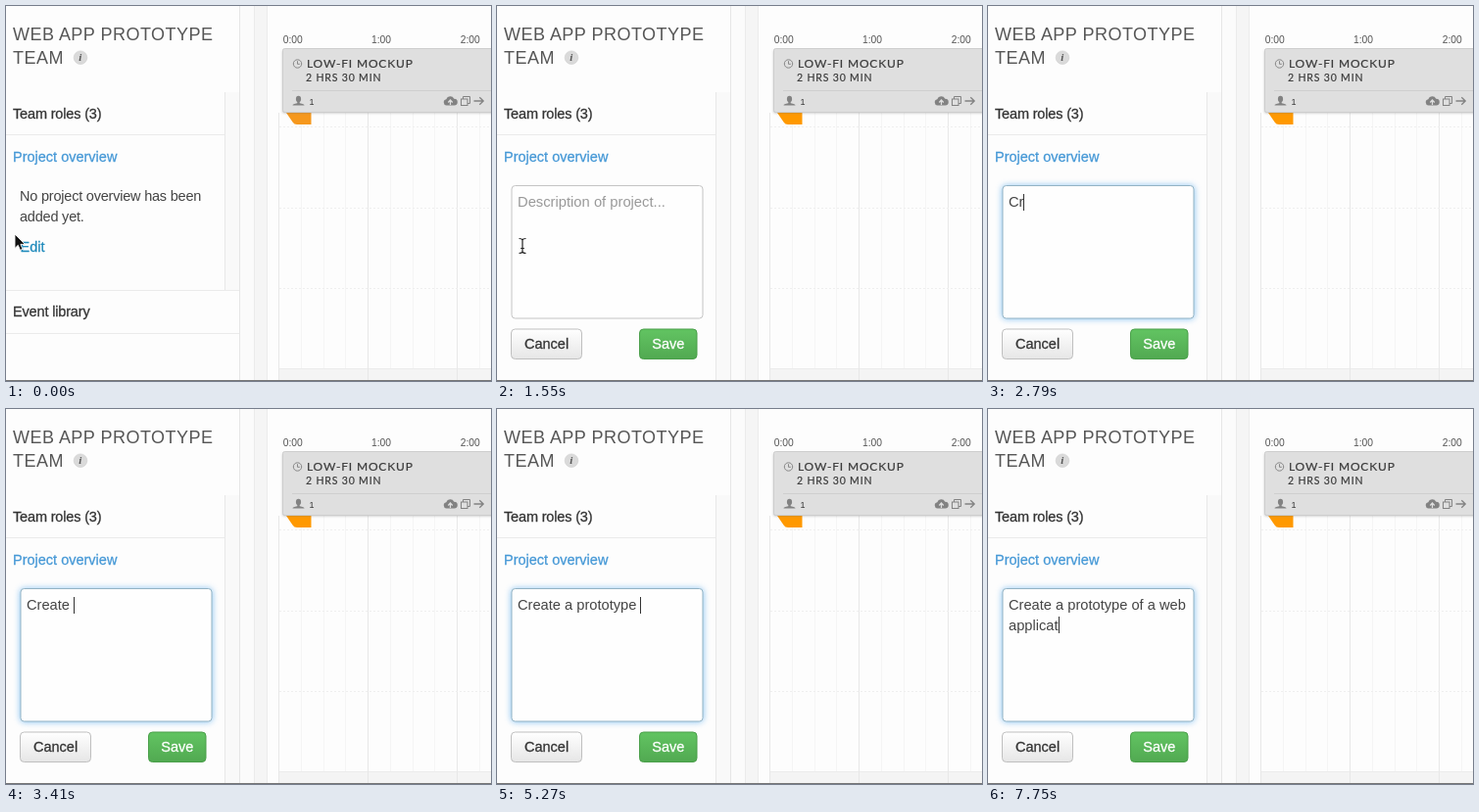
Write an HTML page that moves like this. It is 495 px wide and 383 px high and loops after 8000 ms.

```html
<!DOCTYPE html>
<html lang="en">
<head>
<meta charset="utf-8">
<title>Project overview editor</title>
<style>
html, body { margin: 0; width: 100%; height: 100%; overflow: hidden; background: #fdfdfd; }
svg { display: block; width: 495px; height: 383px; }
text { font-family: "Liberation Sans", Arial, sans-serif; font-size: 14.5px; fill: #333; white-space: pre; }
.title { font-size: 18px; letter-spacing: .47px; fill: #565656; }
.light { letter-spacing: -.21px; fill: #444; }
.head { letter-spacing: -.16px; }
.head, .link, .bold { stroke-width: .28px; }
.head { stroke: #333; }
.link { fill: #4598d6; stroke: #4598d6; }
.typed { font-size: 14.67px; fill: #444; }
.hint { font-size: 14.75px; fill: #999; }
.hour { font-size: 10.3px; fill: #555; }
.card { font-family: Lato, sans-serif; letter-spacing: .83px; fill: #3c3c3c; stroke: #3c3c3c; stroke-width: .2px; }
.crisp { shape-rendering: crispEdges; }
</style>
</head>
<body>
<svg viewBox="0 0 495 383" xmlns="http://www.w3.org/2000/svg">
  <defs>
    <linearGradient id="pale" x2="0" y2="1"><stop stop-color="#fff"/><stop offset="1" stop-color="#e6e6e6"/></linearGradient>
    <linearGradient id="green" x2="0" y2="1"><stop stop-color="#62c462"/><stop offset="1" stop-color="#51a951"/></linearGradient>
    <filter id="blur" x="-10%" y="-10%" width="120%" height="120%"><feGaussianBlur stdDeviation="3"/></filter>
    <filter id="soft" x="-10%" y="-10%" width="120%" height="130%"><feGaussianBlur stdDeviation="1"/></filter>
  </defs>

  <rect width="495" height="383" fill="#fdfdfd"/>
  <g id="frame" class="crisp"></g>

  <!-- timeline -->
  <text class="hour" x="282.700" y="38">0:00</text>
  <text class="hour" x="373" y="38">1:00</text>
  <text class="hour" x="463.700" y="38">2:00</text>
  <path id="flag" d="M286 109H311.500V121H297Q294 121 292.500 118.500Z"/>
  <rect x="282" y="45" width="220" height="64.500" rx="2" fill="#777" opacity=".4" filter="url(#soft)"/>
  <rect x="282.500" y="43.500" width="220" height="65" rx="2" fill="#dfdfdf" stroke="#cdcdcd"/>
  <path class="crisp" d="M292 86.500H495" stroke="#cfcfcf"/>
  <g fill="none" stroke="#888">
    <circle cx="297.500" cy="59" r="4.200"/>
    <path d="M297.500 56.200V59.300H299.800"/>
  </g>
  <text class="card" x="307" y="63" style="font-size:12px">LOW-FI MOCKUP</text>
  <text class="card" x="306" y="76.600" style="font-size:10.5px">2 HRS 30 MIN</text>
  <g fill="#828282">
    <ellipse cx="298.500" cy="95" rx="2.600" ry="3.300"/>
    <path d="M297.300 97H299.700V99.300Q304.500 100 304.500 101.500H292.500Q292.500 100 297.300 99.300Z"/>
    <path d="M449.500 101.500A3.200 3.200 0 0 1 449.300 95.200A4.400 4.400 0 0 1 457.300 94.700A3.400 3.400 0 0 1 457.500 101.500Z"/>
  </g>
  <path d="M453.500 101V97M451.300 98.500L453.500 96L455.700 98.500" fill="none" stroke="#dfdfdf" stroke-width="1.200"/>
  <g fill="none" stroke="#828282">
    <path d="M466.500 95V92.500H473.500V99.500H471"/>
    <rect x="464.500" y="95" width="6.500" height="6.500"/>
    <path d="M477.500 97H487M483.300 93.300L487.200 97L483.300 100.700" stroke-width="1.300"/>
  </g>
  <text x="309.500" y="100.700" style="font-size:9px">1</text>

  <!-- sidebar -->
  <text class="title" x="7" y="35">WEB APP PROTOTYPE</text>
  <text class="title" x="7" y="59">TEAM</text>
  <circle cx="76" cy="52.700" r="6.800" fill="#dadada" stroke="#cdcdcd" stroke-width=".6"/>
  <text x="74.300" y="56.400" style="font:italic bold 11px 'Liberation Serif',serif;fill:#555">i</text>
  <text class="head" x="7" y="114.500">Team roles (3)</text>
  <text class="link" x="7" y="158.500">Project overview</text>

  <g id="view">
    <text class="light" x="14" y="199">No project overview has been</text>
    <text class="light" x="14" y="219.500">added yet.</text>
    <text id="edit" class="bold" x="14.500" y="251">Edit</text>
    <path id="line" class="crisp" d="M15 252.500H40" stroke="#0b5874"/>
    <text class="head" x="7" y="317">Event library</text>
  </g>

  <g id="form">
    <rect id="glow" x="14" y="183" width="197" height="137" rx="5" fill="#52a8ec" filter="url(#blur)"/>
    <rect id="box" x="15" y="183.500" width="195" height="135.500" rx="3.500" fill="#fefefe"/>
    <text id="hint" class="hint" x="21" y="205">Description of project...</text>
    <text id="row0" class="typed" x="21" y="205"></text>
    <text id="row1" class="typed" x="21" y="225.500"></text>
    <rect id="caret" class="crisp" width="1" height="17" fill="#333"/>
    <rect x="14.500" y="330" width="72" height="30.500" rx="4" fill="url(#pale)" stroke="#bfbfbf"/>
    <text class="bold" x="28" y="350.300" stroke="#333">Cancel</text>
    <rect x="145.500" y="330" width="58.500" height="30.500" rx="4" fill="url(#green)" stroke="#4a9f4a"/>
    <text class="bold" x="158.300" y="350.300" stroke="#fff" style="fill:#fff">Save</text>
  </g>

  <g id="arrow"><path d="M0 0V14.500L3.300 11.300L5.500 16.400L8 15.300L5.900 10.400H10.500Z" fill="#111" stroke="#fff" stroke-width=".9"/></g>
  <g id="hand">
    <g transform="scale(.93)">
      <path d="M0 1.500Q1.500-1 3 1.500V6.500Q4.500 5.200 6 6.800Q7.600 5.800 8.800 7.400Q11 6.800 11.300 9V13L9.800 16V18.500H.8V16.500L-4.300 11Q-5.800 8.800-3.700 8.400Q-2.300 8.300 0 10.700Z" fill="#fff" stroke="#222" stroke-width="1.200" stroke-linejoin="round"/>
      <path d="M3 6.500V10M6 7V10M8.800 7.500V10M2.800 12.500V15.500M5 12.500V15.500M7.200 12.500V15.500" fill="none" stroke="#222" stroke-width=".9"/>
    </g>
  </g>
  <g id="beam">
    <path d="M-3.500-7.500Q-.5-7.500 0-6Q.5-7.500 3.500-7.500M0-6V6M-3.500 7.500Q-.5 7.500 0 6Q.5 7.500 3.500 7.500M-1.800 2.500H1.800" fill="none" stroke="#222" stroke-width="1.200"/>
  </g>
  <rect class="crisp" y="382" width="495" height="1" fill="#777"/>
</svg>

<script>
const LOOP = 8000, TICK = 310;
const FIRST = "Create a prototype of a web ";
const TEXT = FIRST + "applicat";
const $ = id => document.getElementById(id);
const show = (id, on) => $(id).style.display = on ? "" : "none";
const place = (id, p) => $(id).setAttribute("transform", `translate(${p})`);

// letters typed at each tick, starting with tick 9
const typed = [2, 4, 7, 8, 9, 11, 13, 15, 19, 20, 23, 27, 29, 30, 32, 33, 36];

function rect(x, y, w, h, fill, id) {
  const r = document.createElementNS("http://www.w3.org/2000/svg", "rect");
  Object.entries({ x, y, width: w, height: h, fill }).forEach(([k, v]) => r.setAttribute(k, v));
  if (id) r.id = id;
  $("frame").append(r);
}

function buildFrame() {
  rect(223, 88, 15, 295, "#f9f9f9", "track");
  rect(223, 88, 1, 295, "#e8e8e8", "trackEdge");
  rect(0, 131, 223, 1, "#ebebeb");
  rect(0, 290, 239, 1, "#ebebeb", "rule0");
  rect(0, 334, 239, 1, "#ebebeb", "rule1");
  rect(238, 0, 1, 383, "#e6e6e6");
  rect(239, 0, 14, 383, "#fbfbfb");
  rect(253, 0, 14, 383, "#f5f5f5");
  rect(253, 0, 1, 383, "#ebebeb");
  rect(266, 0, 1, 383, "#ebebeb");
  rect(279, 370, 216, 12, "#f4f4f4");
  rect(279, 370, 216, 1, "#ececec");
  for (let i = 0; i < 10; i++) {
    const major = i % 4 === 0;
    rect(Math.round(278 + i * 22.75), 109, 1, major ? 273 : 261, major ? "#e8e8e8" : "#f5f5f5");
  }
  for (const y of [123, 206, 288])
    for (let x = 279; x < 495; x += 4) rect(x, y, 2, 1, "#efefef");
}

function draw(ms) {
  const n = Math.floor((ms % LOOP) / TICK);
  const editing = n >= 5, hover = n === 4;
  const count = n < 9 ? 0 : typed[Math.min(n - 9, typed.length - 1)];
  const text = TEXT.slice(0, count);
  const editColor = hover ? "#0b5874" : "#1f8abb";

  $("flag").setAttribute("fill", n < 4 ? "#f6981d" : "#ff9900");
  show("view", !editing);
  show("form", editing);
  show("rule0", !editing);
  show("rule1", !editing);
  for (const id of ["track", "trackEdge"]) $(id).setAttribute("height", editing ? 294 : 202);

  $("edit").style.fill = $("edit").style.stroke = editColor;
  show("line", hover);

  show("arrow", n < 4);
  place("arrow", n < 3 ? [9, 233] : [11, 239]);
  show("hand", hover);
  place("hand", [23.5, 243]);
  show("beam", editing && n < 9);
  place("beam", n === 5 ? [26, 245] : n === 6 ? [62, 234] : [75, 229]);

  if (!editing) return;
  $("glow").setAttribute("opacity", n < 7 ? 0 : n === 7 ? .4 : .65);
  $("box").setAttribute("stroke", n < 7 ? "#c4c4c4" : "#93b3c4");
  show("hint", !count);
  $("row0").textContent = text.slice(0, FIRST.length);
  $("row1").textContent = text.slice(FIRST.length);
  const row = count > FIRST.length ? 1 : 0;
  const end = count ? $("row" + row).getComputedTextLength() : 0;
  show("caret", n >= 7);
  $("caret").setAttribute("x", Math.round(21 + end));
  $("caret").setAttribute("y", 192 + row * 20);
}

buildFrame();
const start = performance.now();
function loop(now) {
  draw(Math.max(0, now - start));
  requestAnimationFrame(loop);
}
draw(0);
requestAnimationFrame(loop);
</script>
</body>
</html>
```
